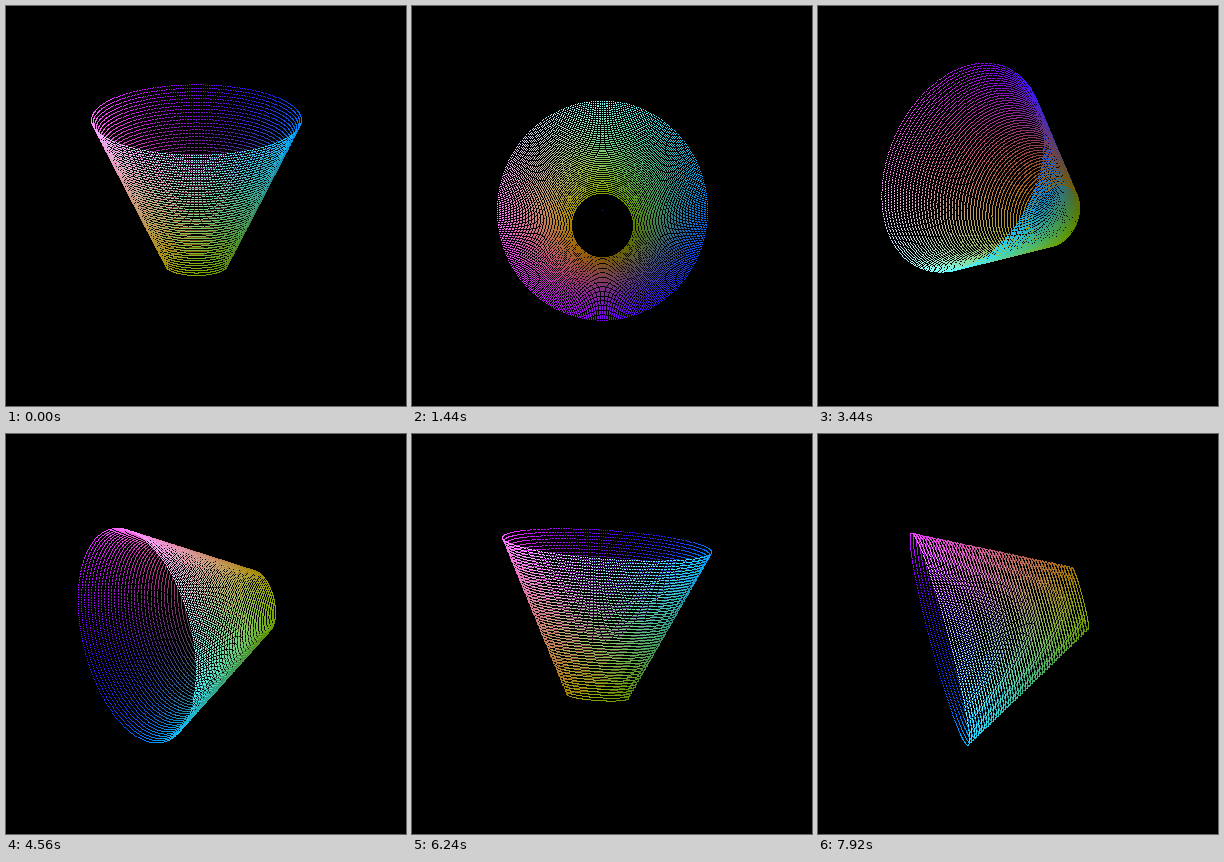
An HTML page with a canvas for the animation above (8000 ms loop, 400 by 400 pixels).

```html
<!DOCTYPE html>
<html lang="en">
<head>
<meta charset="utf-8">
<title>Rotating cone of dots</title>
<style>
  html, body { margin: 0; width: 100%; height: 100%; overflow: hidden; background: #000; }
  canvas { display: block; width: 100vw; height: 100vh; image-rendering: pixelated; }
</style>
</head>
<body>
<canvas id="stage" width="400" height="400"></canvas>
<script>
const SIZE = 400, STEP = 80, STEPS = 100;
const RINGS = 50, DOTS = 360;
const R_MIN = 0.295, SLOPE = 1.973;
const SX = 105, SY = 110, CX = 190;
const TUMBLE_END = 29;
const RAD = Math.PI / 180;

const ctx = document.getElementById('stage').getContext('2d');
const image = ctx.createImageData(SIZE, SIZE);
const pixels = new Uint32Array(image.data.buffer);
const BLACK = 0xff000000;

const dot = (a, b) => a[0] * b[0] + a[1] * b[1] + a[2] * b[2];
const cross = (a, b) => [
  a[1] * b[2] - a[2] * b[1],
  a[2] * b[0] - a[0] * b[2],
  a[0] * b[1] - a[1] * b[0]
];
const rgb = (r, g, b) => (BLACK | b << 16 | g << 8 | r) >>> 0;

// Turn v by angle about the unit axis n.
function turn(v, n, angle) {
  const c = Math.cos(angle), s = Math.sin(angle);
  const k = dot(n, v) * (1 - c), w = cross(n, v);
  return v.map((x, i) => n[i] * k + x * c + w[i] * s);
}

// The cone as dots: side, front and axial coordinates with a colour.
const cone = [{ side: 0, front: 0, depth: 0, color: rgb(10, 60, 150) }];
for (let j = 0; j < DOTS; j++) {
  const phi = (j - DOTS / 2) * 2 * Math.PI / DOTS;
  for (let i = 0; i < RINGS; i++) {
    const up = i / (RINGS - 1);
    const r = R_MIN + (1 - R_MIN) * up;
    const side = r * Math.cos(phi), front = r * Math.sin(phi);
    cone.push({
      side, front, depth: SLOPE * (1 - r),
      color: rgb(
        Math.round(127.5 + 127.5 * side),
        Math.round(127.5 + 127.5 * front),
        Math.round(255 * up)
      )
    });
  }
}

// First a tumble about the horizontal, then a spin about a slanted axis.
function pose(n) {
  if (n < TUMBLE_END) {
    const t = 18.7 * RAD - 0.1 * n;
    return { axis: [0, Math.cos(t), Math.sin(t)], left: [-1, 0, 0], rim: 0.968, cy: 214.5 };
  }
  const spin = [0.751, -0.641, 0.161];
  const t = 7.82 * RAD * (n - 31.86);
  return {
    axis: turn([0.07, 0.99, 0.12], spin, t),
    left: turn([-0.973, 0.041, 0.223], spin, t),
    rim: 0.682, cy: 184.7
  };
}

function draw(n) {
  const { axis, left, rim, cy } = pose(n);
  const fwd = cross(axis, left);
  pixels.fill(BLACK);
  for (const p of cone) {
    const h = rim - p.depth;
    const x = Math.round(CX + SX * (axis[0] * h + left[0] * p.side + fwd[0] * p.front));
    const y = Math.round(cy - SY * (axis[1] * h + left[1] * p.side + fwd[1] * p.front));
    pixels[y * SIZE + x] = p.color;
  }
  ctx.putImageData(image, 0, 0);
}

let start = null, shown = 0;
function tick(now) {
  if (start === null) start = now;
  const n = Math.floor(Math.max(0, now - start) / STEP) % STEPS;
  if (n !== shown) draw(shown = n);
  requestAnimationFrame(tick);
}
draw(0);
requestAnimationFrame(tick);
</script>
</body>
</html>
```
